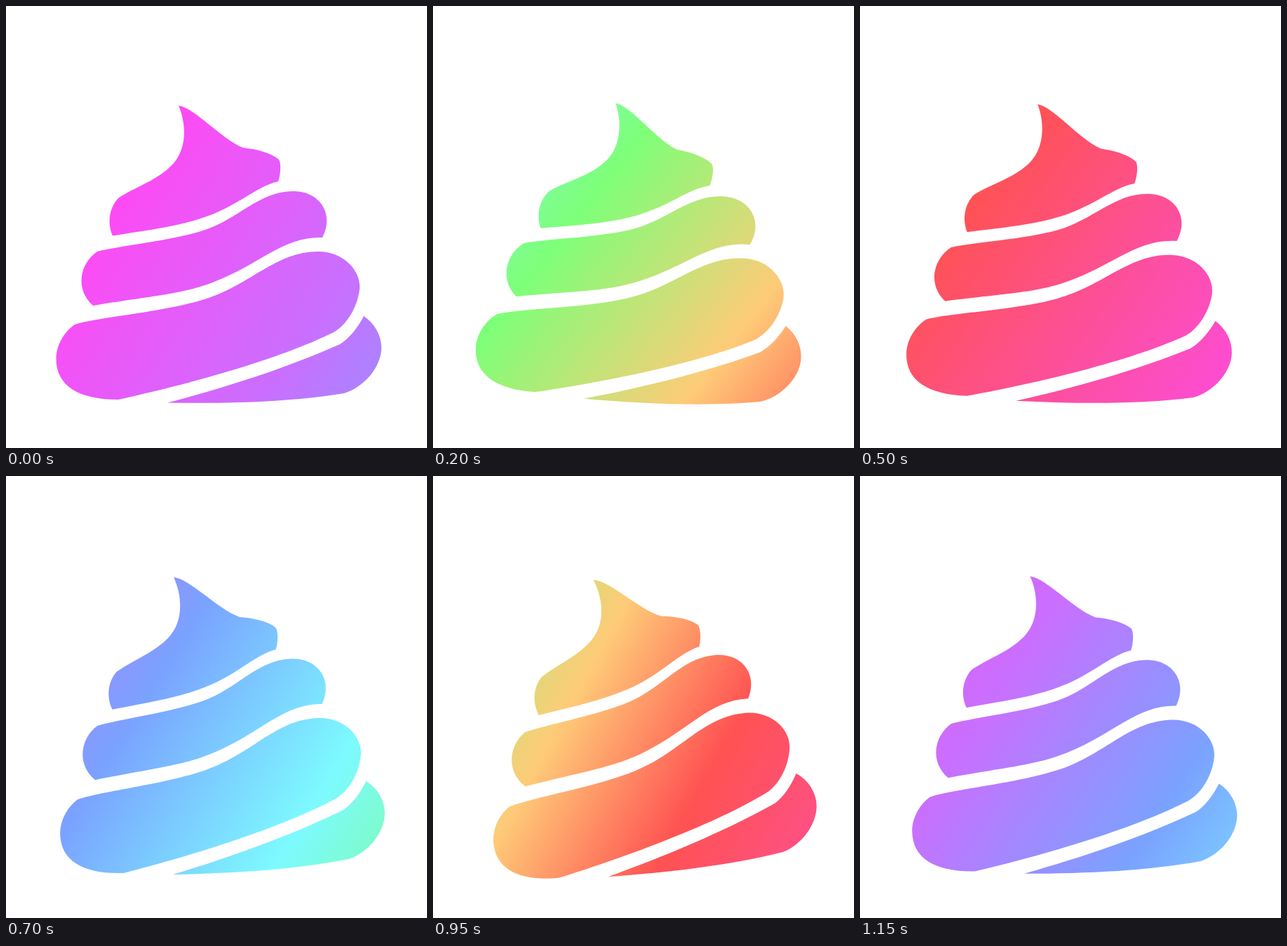
An HTML page with a canvas for the animation above (1200 ms loop, 600 by 630 pixels).

```html
<!DOCTYPE html>
<html lang="en">
<head>
<meta charset="utf-8">
<title>Rainbow swirl</title>
<style>
  html, body { margin: 0; height: 100%; overflow: hidden; background: #fff; }
  canvas { display: block; }
</style>
</head>
<body>
<canvas id="stage" width="600" height="630"></canvas>
<script>
const ctx = document.getElementById("stage").getContext("2d");
const STEP = 50, STEPS = 24;
const PIVOT = [305, 345];
const RAD = Math.PI / 180;
const TILT = 34 * RAD; // direction of the colour bands
const BAND = 283, CYCLE = 8; // pixels per band, bands per rainbow

// Colour and its place in the rainbow, in bands
const rainbow = [
  ["#c870ff", 0], ["#7aa2ff", 1], ["#7dfaff", 2], ["#7eff78", 3],
  ["#fecb78", 4], ["#ff5252", 4.78], ["#fc4faa", 5.85], ["#fe4af4", 6.8]
];

const swirl = new Path2D(`
  M246 142 C269 145 307 190 338 202 C356 204 378 209 389 219
  C392 224 392 238 388 250 C356 257 329 287 277 303
  C239 315 205 319 152 327.5 C144 309 147 288 160 274
  C183 258 218 248 239 224 C258 202 257 168 246 142Z
  M130 350 C165 341 234 335 281 320 C331 304 361 264 409 264
  C449 264 468 298 451 330 C395 328 362 368 297 393
  C251 411 215 412 124 427 C98 404 105 367 130 350Z
  M98 454 C133 443 222 437 283 418 C350 397 384 350 445 350
  C482 350 506 378 504 403 C501 430 485 455 467 465
  C391 503 261 539 160 561 C106 561 71 543 71.5 502
  C72 484 82 465 98 454Z
  M510 442 C526 453 535 470 535 487 C535 514 511 543 482 552
  C410 564 322 567 230 565.5 C312 544 400 516 476 482
  C489 474 501 459 510 442Z`);

// Two rainbows end to end, sliding one band per step
function bands(n) {
  const at = d => [PIVOT[0] + d * Math.cos(TILT), PIVOT[1] + d * Math.sin(TILT)];
  const from = BAND * ((n + 1) % CYCLE - CYCLE) - 105;
  const fill = ctx.createLinearGradient(...at(from), ...at(from + 2 * CYCLE * BAND));
  for (const [color, place] of rainbow) {
    fill.addColorStop(place / CYCLE / 2, color);
    fill.addColorStop((place + CYCLE) / CYCLE / 2, color);
  }
  return fill;
}

function draw(now) {
  const n = Math.floor(now / STEP) % STEPS;
  const angle = 6 - Math.abs((n + 6) % STEPS - 12); // rocks between -6 and 6 degrees
  ctx.clearRect(0, 0, 600, 630);
  ctx.save();
  ctx.translate(...PIVOT);
  ctx.rotate(angle * RAD);
  ctx.translate(-PIVOT[0], -PIVOT[1]);
  ctx.fillStyle = bands(n);
  ctx.fill(swirl);
  ctx.restore();
}

const start = performance.now();
function tick() {
  draw(performance.now() - start);
  requestAnimationFrame(tick);
}
tick();
</script>
</body>
</html>
```
